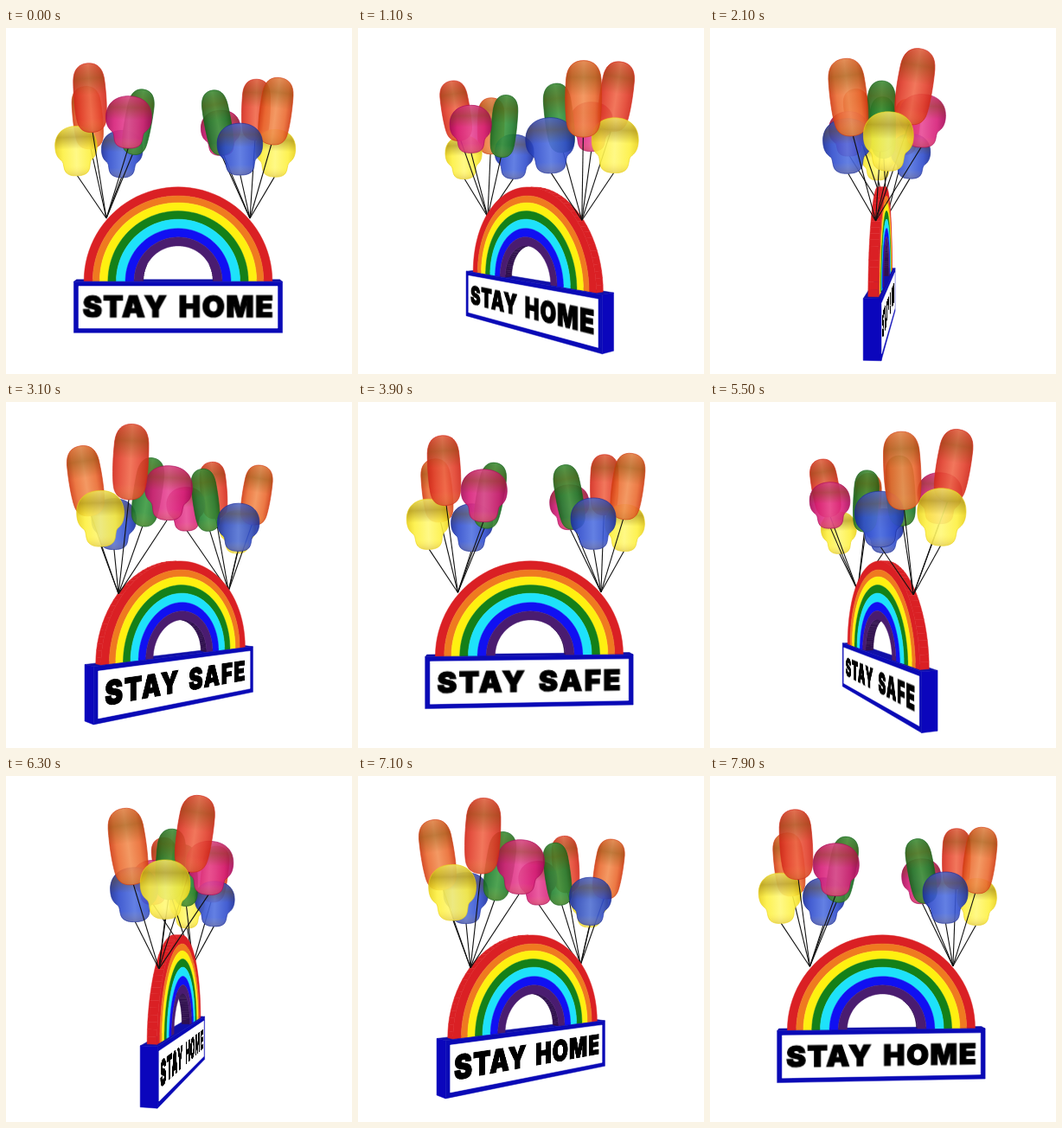
Write an HTML page with a canvas that moves like this. It is 400 px wide and 400 px high and loops after 8000 ms.

```html
<!DOCTYPE html>
<html lang="en">
<head>
<meta charset="utf-8">
<title>Stay home, stay safe</title>
<style>
html, body { margin: 0; width: 100%; height: 100%; overflow: hidden; background: #fff; }
#stage { position: relative; width: 400px; height: 400px; overflow: hidden; }
canvas { position: absolute; left: 0; top: 0; }
.side {
  position: absolute; inset: 0;
  transform-origin: 199px 200px;
  backface-visibility: hidden;
}
.side span {
  position: absolute; left: 199.5px; top: 321px;
  transform: translate(-50%, -50%);
  font: 900 33.4px/40px Inter, Lato, sans-serif;
  letter-spacing: 1.5px; word-spacing: 4px; white-space: nowrap;
  color: #000; -webkit-text-stroke: 1.2px #000;
}
#safe span { letter-spacing: 2.5px; }
</style>
</head>
<body>
<div id="stage">
  <canvas id="view" width="400" height="400"></canvas>
  <div class="side" id="home"><span>STAY HOME</span></div>
  <div class="side" id="safe"><span>STAY SAFE</span></div>
</div>
<script>
const ctx = document.getElementById('view').getContext('2d');
const home = document.getElementById('home');
const safe = document.getElementById('safe');

const LOOP = 8000, STEP = 100;
const CX = 199, CY = 200, DIST = 640;
const BOX = { w: 119, top: 92, bottom: 150.3, d: 8.5 };
const ARCH_DEPTH = 5;
const RADII = [108, 98, 90, 80.5, 71, 60.5, 50.5, 40.5];
const BANDS = ['#da2024', '#ef7a20', '#fff010', '#148018', '#1ee2fa', '#1010f2', '#4a1c70'];
const TIE = { x: -83, y: 20, z: 0 };

// edge, body and light tones
const TONES = {
  red: ['#d2281a', '#e2402c', '#f0684a'],
  orange: ['#d23c12', '#ea6a30', '#f28e52'],
  green: ['#14641c', '#228030', '#3c9a40'],
  pink: ['#a80858', '#d61e78', '#e84a96'],
  yellow: ['#ead21c', '#fdf040', '#fff878'],
  blue: ['#182c9a', '#2f4ccc', '#5272e0']
};

// one cluster; the other is the same cluster turned half way round
const CLUSTER = [
  { tone: 'red', x: -95.5, z: 39.5, y: -112, w: 17.2, h: 37.5, long: true },
  { tone: 'orange', x: -108.5, z: -24, y: -100, w: 17.5, h: 37.5, long: true },
  { tone: 'green', x: -46, z: 2.5, y: -91, w: 15.3, h: 38, long: true },
  { tone: 'pink', x: -53, z: 46.5, y: -84.5, w: 24.5, h: 28 },
  { tone: 'yellow', x: -115, z: 15, y: -56.5, w: 23.7, h: 28 },
  { tone: 'blue', x: -68, z: -31, y: -57, w: 25, h: 28.5 }
];
const BALLOONS = CLUSTER.flatMap(b => [
  { ...b, tie: TIE },
  { ...b, x: -b.x, z: -b.z, tie: { ...TIE, x: -TIE.x } }
]);

// right half of each outline, top to bottom
const LONG = [
  [0.58, -1, 0.92, -0.84, 0.98, -0.52],
  [1.04, -0.1, 1.02, 0.4, 0.92, 0.66],
  [0.82, 0.92, 0.45, 1, 0, 1]
];
const BULB = [
  [0.6, -1, 1, -0.7, 1, -0.2],
  [1, 0.15, 0.85, 0.28, 0.7, 0.38],
  [0.6, 0.48, 0.66, 0.72, 0.52, 0.86],
  [0.36, 1, 0.15, 1, 0, 1]
];

let cos = 1, sin = 0;

function project(x, y, z) {
  const s = DIST / (DIST - (x * sin + z * cos));
  return { x: CX + (x * cos - z * sin) * s, y: CY + y * s, s };
}

// the thin stroke closes the seams between neighbouring polygons
function fill(pts, color) {
  ctx.beginPath();
  pts.forEach(p => ctx.lineTo(p.x, p.y));
  ctx.closePath();
  ctx.fillStyle = ctx.strokeStyle = color;
  ctx.lineWidth = 0.5;
  ctx.fill();
  ctx.stroke();
}

function area(pts) {
  return pts.reduce((sum, p, i) => {
    const q = pts[(i + 1) % pts.length];
    return sum + p.x * q.y - q.x * p.y;
  }, 0);
}

const arc = (r, z, n = 48) =>
  Array.from({ length: n + 1 }, (_, i) => {
    const a = Math.PI * (1 - i / n);
    return project(r * Math.cos(a), BOX.top - r * Math.sin(a), z);
  });

// +1 or -1 for the face turned to the viewer, 0 when edge-on
const facing = depth => Math.abs(DIST * cos) > depth ? Math.sign(cos) : 0;

function wall(r, color, dir) {
  const front = arc(r, ARCH_DEPTH), back = arc(r, -ARCH_DEPTH);
  for (let i = 0; i < front.length - 1; i++) {
    const quad = [front[i], front[i + 1], back[i + 1], back[i]];
    if (area(quad) * dir < 0) fill(quad, color);
  }
}

function drawArch() {
  wall(RADII[7], '#30104e', -1);
  wall(RADII[0], BANDS[0], 1);
  const k = facing(ARCH_DEPTH);
  if (!k) return;
  BANDS.forEach((color, i) => {
    const inner = arc(RADII[i + 1], k * ARCH_DEPTH);
    fill([...arc(RADII[i], k * ARCH_DEPTH), ...inner.reverse()], color);
  });
}

function panel(x, top, bottom, z) {
  return [project(-x, top, z), project(x, top, z), project(x, bottom, z), project(-x, bottom, z)];
}

function drawTop() {
  const { w, top, d } = BOX;
  fill([project(-w, top, d), project(w, top, d), project(w, top, -d), project(-w, top, -d)], '#1010a8');
}

function drawBox() {
  const { w, top, bottom, d } = BOX;
  for (const x of [w, -w]) {
    const end = [project(x, top, d), project(x, top, -d), project(x, bottom, -d), project(x, bottom, d)];
    if (area(end) * x > 0) fill(end, '#0b06bc');
  }
  const k = facing(d);
  if (!k) return;
  fill(panel(w, top, bottom, k * d), '#0a0ab6');
  fill(panel(w - 5.5, top + 5.2, bottom - 5.2, k * d), '#fff');
}

function outline(half) {
  ctx.beginPath();
  ctx.moveTo(0, -1);
  half.forEach(c => ctx.bezierCurveTo(...c));
  // back up the mirrored side
  for (let i = half.length - 1; i >= 0; i--) {
    const [ax, ay, bx, by] = half[i];
    const [ex, ey] = i ? half[i - 1].slice(4) : [0, -1];
    ctx.bezierCurveTo(-bx, by, -ax, ay, -ex, ey);
  }
  ctx.closePath();
}

function gradient(x0, y0, x1, y1, stops) {
  const g = ctx.createLinearGradient(x0, y0, x1, y1);
  stops.forEach(([at, color]) => g.addColorStop(at, color));
  return g;
}

function drawBalloon(b) {
  const p = project(b.x, b.y, b.z);
  const tie = project(b.tie.x, b.tie.y, b.tie.z);
  const lean = Math.atan2(p.x - tie.x, tie.y - p.y) * (b.long ? 0.55 : 0.1);
  const w = b.w * p.s, h = b.h * p.s;
  const [edge, body, light] = TONES[b.tone];

  ctx.beginPath();
  ctx.moveTo(p.x - Math.sin(lean) * h, p.y + Math.cos(lean) * h);
  ctx.lineTo(tie.x, tie.y);
  ctx.strokeStyle = '#111';
  ctx.lineWidth = 1.1;
  ctx.stroke();

  ctx.save();
  ctx.translate(p.x, p.y);
  ctx.rotate(lean);
  ctx.scale(w, h);
  outline(b.long ? LONG : BULB);
  ctx.globalAlpha = 0.9;
  ctx.fillStyle = gradient(-1, 0, 1, 0,
    [[0, edge], [0.18, body], [0.5, light], [0.82, body], [1, edge]]);
  ctx.fill();
  ctx.globalAlpha = 1;
  ctx.fillStyle = gradient(0, -1, 0, 1, [
    [0, 'rgba(110,60,0,.1)'], [0.22, 'rgba(110,75,0,.38)'], [0.46, 'rgba(110,75,0,0)'],
    [0.8, 'rgba(255,200,60,0)'], [1, 'rgba(140,80,0,.2)']
  ]);
  ctx.fill();
  ctx.restore();
  ctx.strokeStyle = edge;
  ctx.globalAlpha = 0.7;
  ctx.lineWidth = 0.9;
  ctx.stroke();
  ctx.globalAlpha = 1;
}

function draw(turn) {
  cos = Math.cos(turn);
  sin = Math.sin(turn);
  ctx.fillStyle = '#fff';
  ctx.fillRect(0, 0, 400, 400);

  const depth = b => b.x * sin + b.z * cos;
  const sorted = [...BALLOONS].sort((a, b) => depth(a) - depth(b));
  sorted.filter(b => depth(b) < 0).forEach(drawBalloon);
  drawTop();
  drawArch();
  drawBox();
  sorted.filter(b => depth(b) >= 0).forEach(drawBalloon);

  const place = (el, a) => {
    el.style.transform = `perspective(${DIST}px) rotateY(${a}rad) translateZ(${BOX.d}px)`;
  };
  place(home, -turn);
  place(safe, Math.PI - turn);
  const k = facing(BOX.d);
  home.style.visibility = k > 0 ? 'visible' : 'hidden';
  safe.style.visibility = k < 0 ? 'visible' : 'hidden';
}

const start = performance.now();
function tick() {
  const t = Math.max(0, performance.now() - start) % LOOP;
  draw(Math.floor(t / STEP) * STEP / LOOP * 2 * Math.PI);
  requestAnimationFrame(tick);
}
tick();
</script>
</body>
</html>
```
